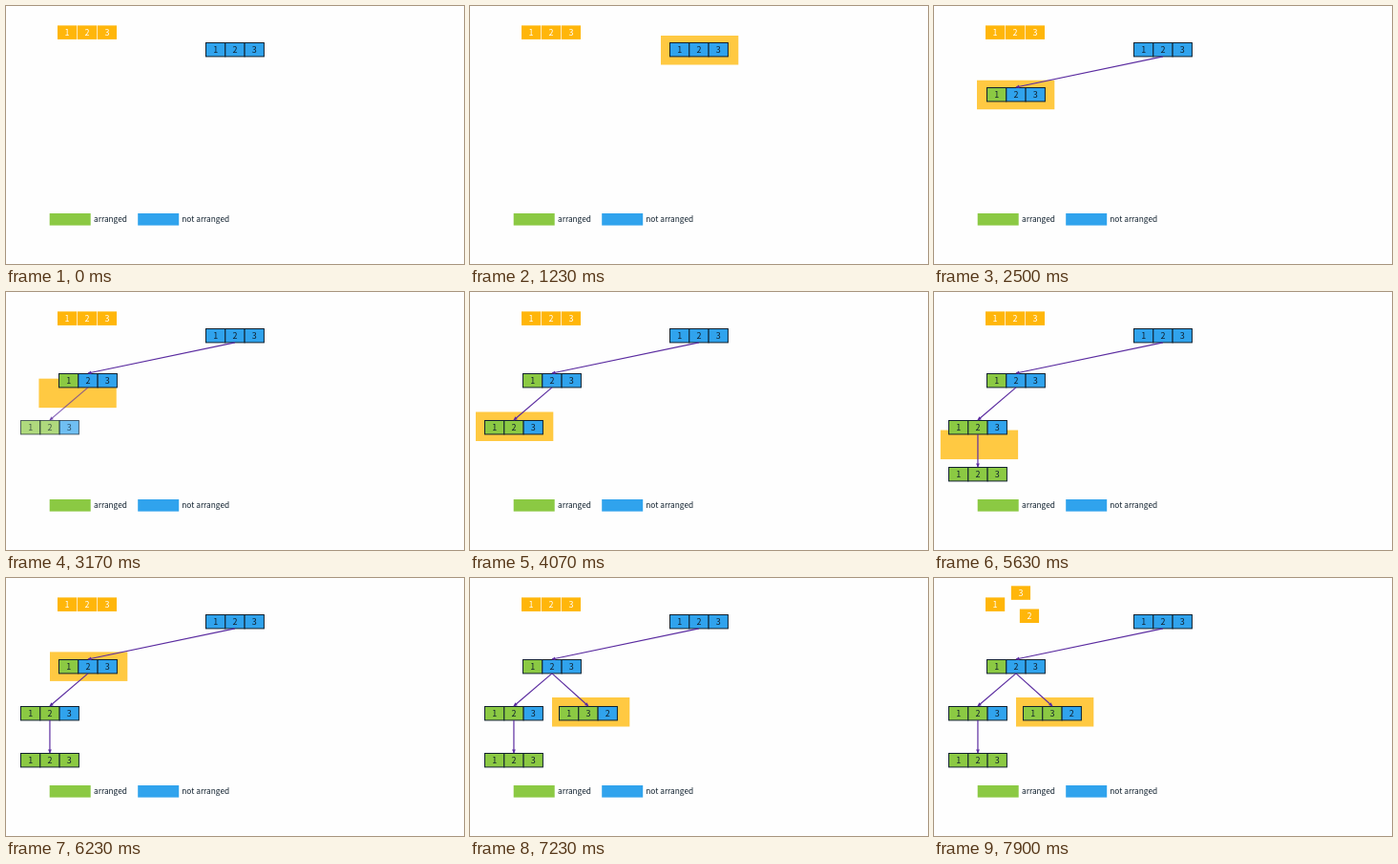
Recreate the animation shown at these times as an HTML page with a canvas. Size 480 px wide and 270 px high, loop 8 s.

```html
<!DOCTYPE html>
<html lang="en">
<head>
<meta charset="utf-8">
<title>Permutation tree</title>
<style>
  html, body { margin: 0; width: 100%; height: 100%; overflow: hidden; background: #fefefe; }
  canvas { display: block; width: 480px; height: 270px; }
</style>
</head>
<body>
<canvas id="stage" width="480" height="270"></canvas>
<script>
const ctx = document.getElementById('stage').getContext('2d');
const LOOP = 8000, CELL = 20.3, HEIGHT = 14.4;
const FONT = '"Noto Sans CJK SC", "Noto Sans CJK", "Noto Sans", sans-serif';
const GREEN = '#8bc943', BLUE = '#30a3ed', PURPLE = '#5b2ca0';
const YELLOW = '#ffb60a', HIGHLIGHT = '#ffc942', INK = '#10202e';

// fixed: number of cells, from the left, that are already arranged
const nodes = [
  { x: 209.5, y: 38.5, digits: '123', fixed: 0, at: -1000 },
  { x: 55.5, y: 85.5, digits: '123', fixed: 1, at: 2000, parent: 0 },
  { x: 15.5, y: 134.5, digits: '123', fixed: 2, at: 3000, parent: 1 },
  { x: 15.5, y: 183.5, digits: '123', fixed: 3, at: 4500, parent: 2 },
  { x: 93.5, y: 134.5, digits: '132', fixed: 2, at: 6550, parent: 1 },
];

// Resting places of the highlight; each slide begins at start and ends at end
const stops = [
  { start: 1000, end: 1000, x: 200, y: 31 },
  { start: 2000, end: 2450, x: 45, y: 77.7 },
  { start: 3000, end: 3500, x: 6, y: 125.5 },
  { start: 4500, end: 5000, x: 7.3, y: 175 },
  { start: 5400, end: 5800, x: 6.5, y: 125.5 },
  { start: 5800, end: 6200, x: 46, y: 77.4 },
  { start: 6550, end: 7050, x: 86, y: 125 },
];
const SWAP_START = 7350, SWAP_TIME = 850, SWAP_LIFT = 15.5;

const progress = (t, start, end) =>
  end > start ? Math.min(1, Math.max(0, (t - start) / (end - start))) : +(t >= start);
const ease = p => p * p * (3 - 2 * p);
const mix = (a, b, p) => a + (b - a) * p;

function rect(x, y, w, h, color) {
  ctx.fillStyle = color;
  ctx.fillRect(x, y, w, h);
}

function text(str, x, y, size, color, align = 'center') {
  ctx.font = `${size}px ${FONT}`;
  ctx.fillStyle = color;
  ctx.textAlign = align;
  ctx.fillText(str, x, y);
}

function arrow(x1, y1, x2, y2) {
  ctx.strokeStyle = ctx.fillStyle = PURPLE;
  ctx.lineWidth = 1.2;
  ctx.beginPath();
  ctx.moveTo(x1, y1);
  ctx.lineTo(x2, y2);
  ctx.stroke();
  ctx.save();
  ctx.translate(x2, y2);
  ctx.rotate(Math.atan2(y2 - y1, x2 - x1));
  ctx.beginPath();
  ctx.moveTo(0.5, 0);
  ctx.lineTo(-3.5, -1.9);
  ctx.lineTo(-3.5, 1.9);
  ctx.fill();
  ctx.restore();
}

function drawNode({ x, y, digits, fixed }) {
  ctx.lineWidth = 1;
  ctx.strokeStyle = INK;
  [...digits].forEach((digit, i) => {
    const left = x + i * CELL;
    rect(left, y, CELL, HEIGHT, i < fixed ? GREEN : BLUE);
    ctx.strokeRect(left, y, CELL, HEIGHT);
    text(digit, left + CELL / 2, y + 10.4, 9, INK);
  });
}

function drawHighlight(t) {
  const i = stops.findLastIndex(s => t >= s.start);
  if (i < 0) return;
  const to = stops[i], from = stops[i - 1] || to;
  const p = ease(progress(t, to.start, to.end));
  rect(mix(from.x, to.x, p), mix(from.y, to.y, p), 81.3, 30.5, HIGHLIGHT);
}

function drawArray(t) {
  const p = ease(progress(t, SWAP_START, SWAP_START + SWAP_TIME));
  const lift = SWAP_LIFT * Math.sin(Math.PI * p);
  const tile = (digit, slot, dy) => {
    const x = 54 + slot * 20.9, y = 20.4 + dy;
    rect(x, y, 20.2, 14.5, YELLOW);
    text(digit, x + 10.1, y + 10.6, 9, '#fff');
  };
  tile('1', 0, 0);
  tile('2', 1 + p, lift);
  tile('3', 2 - p, -lift);
}

function drawLegend() {
  rect(45.7, 217, 43, 12.6, GREEN);
  text('arranged', 92, 226, 8.3, INK, 'left');
  rect(138.2, 217, 43, 12.6, BLUE);
  text('not arranged', 184.3, 226, 8.3, INK, 'left');
}

function draw(t) {
  rect(0, 0, 480, 270, '#fefefe');
  drawHighlight(t);
  drawArray(t);
  drawLegend();
  for (const node of nodes) {
    ctx.globalAlpha = progress(t, node.at, node.at + 250);
    drawNode(node);
    if (node.parent !== undefined) {
      const from = nodes[node.parent];
      arrow(from.x + CELL * 1.5, from.y + HEIGHT, node.x + CELL * 1.5, node.y - 0.5);
    }
  }
  ctx.globalAlpha = 1;
}

const origin = performance.now();
function tick() {
  draw((performance.now() - origin) % LOOP);
  requestAnimationFrame(tick);
}
tick();
</script>
</body>
</html>
```
